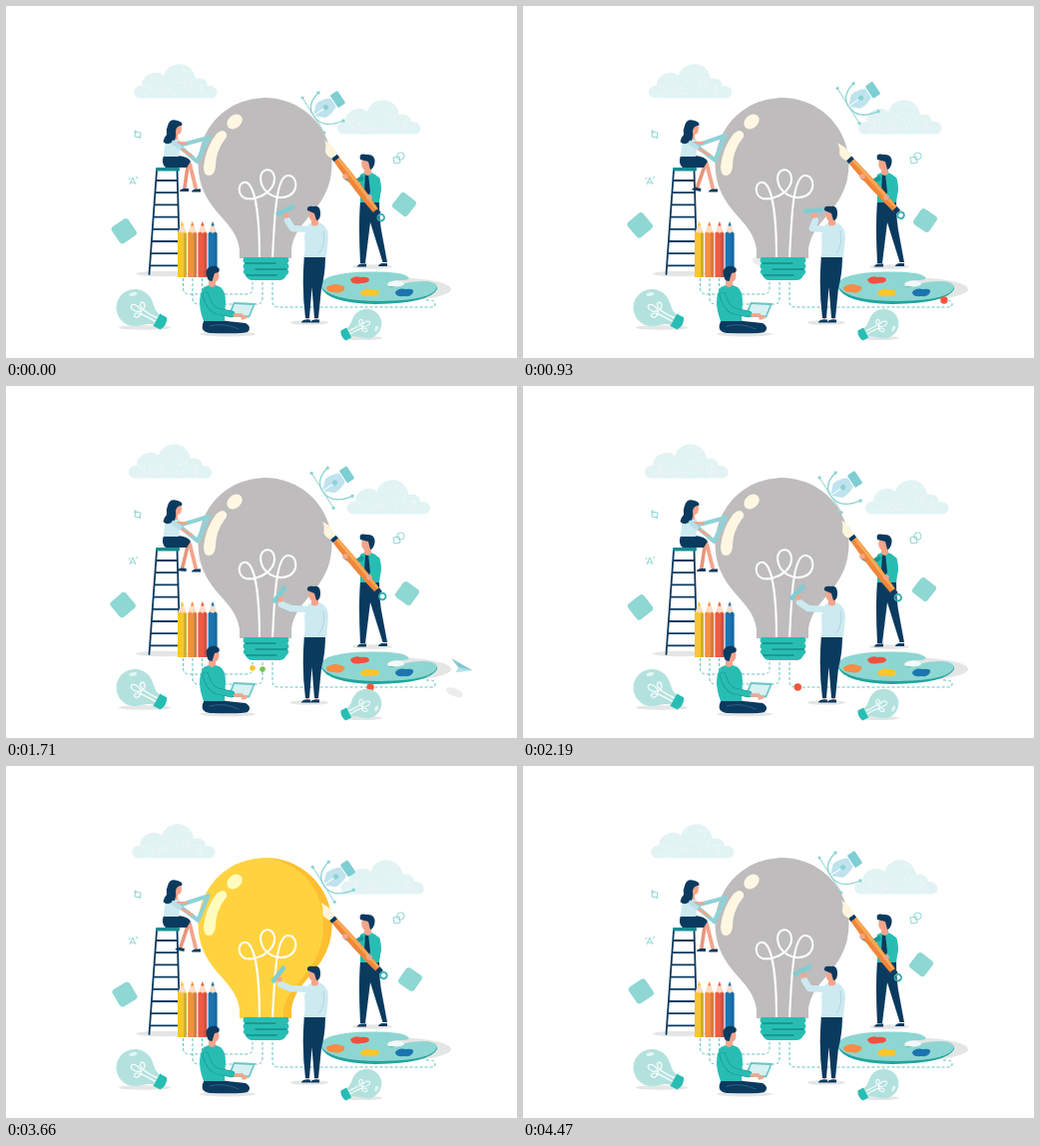
These frames come from a looping animation (512 by 353 pixels, 4.5 s). An HTML page:

```html
<!DOCTYPE html>
<html lang="en">
<head>
<meta charset="utf-8">
<title>Creative team around a light bulb</title>
<style>
html, body { margin: 0; width: 100%; height: 100%; overflow: hidden; background: #fff; }
svg { display: block; }
.line { fill: none; stroke-linecap: round; stroke-linejoin: round; }
.navy { fill: #0b3a5f; }
.teal { fill: #28bdb3; }
.skin { fill: #f3a58b; }
.pale { fill: #cdeaf1; }
.shade { fill: #e4e6e6; }
.dash { fill: none; stroke: #62c3bd; stroke-dasharray: 3 2; }
.icon { fill: none; stroke: #8ed6d3; stroke-width: 1; }
</style>
</head>
<body>
<svg width="512" height="353" viewBox="0 0 512 353">
  <defs>
    <g id="cloud">
      <path fill="#e2f3f4" d="M135 92.500C126 92.500 125.500 80 136 79.500C136 68 152 63 158 70C163 54 187 54 190 73C198 71 202 76 202 80C214 79 214 92.500 205 92.500Z"/>
      <g class="speckles" fill="#fff" opacity=".75"></g>
    </g>
    <g id="smallBulb">
      <path fill="#b3e2de" d="M-18.500 0A18.500 18.500 0 0 1 0 -18.500C13 -18.500 16 -7 25 -6V6C16 7 13 18.500 0 18.500A18.500 18.500 0 0 1 -18.500 0Z"/>
      <path class="line" stroke="#fff" stroke-width="1.200" d="M25 -2C12 -1 3 -2 3 -7C4 -11 10 -7 8 -2C6 4 -4 4 -4 0S6 -4 8 2C9 8 4 10 3 6C3 2 12 2 25 2"/>
      <path class="teal" d="M25 -7h8q4 7 0 14h-8z"/>
      <ellipse cx="-8" cy="-11" rx="4" ry="1.800" transform="rotate(-40 -8 -11)" fill="#e5f6f4"/>
    </g>
    <path id="shoe" class="navy" d="M0 0h5v3h-9q0-2 4-3z"/>
  </defs>

  <use id="cloudL" href="#cloud"/>
  <use id="cloudR" href="#cloud"/>

  <!-- small floating icons -->
  <path class="icon" d="M130 124l-1 7 6 1M128 126l7 1-1 6"/>
  <path class="icon" d="M124 179l3-7 3 7M125 177h4M130 173l2-2M124 172l-1 2"/>
  <g class="icon"><circle cx="395.500" cy="150.500" r="3.600"/><path d="M388 152l6-1 1 6-6 1z"/></g>
  <rect id="tileL" x="-10" y="-10" width="20" height="20" rx="3.500" fill="#8ed7d3"/>
  <rect id="tileR" x="-9.500" y="-9.500" width="19" height="19" rx="3.500" fill="#8ed7d3"/>

  <g id="plane">
    <ellipse cx="-7" cy="26" rx="9" ry="4" transform="rotate(22 -7 26)" fill="#ececec"/>
    <path fill="#b5e3e8" d="M-10 -8L11 4L-6 6L-3 1Z"/>
    <path fill="#83c8d0" d="M-10 -8L11 4L-3 1Z"/>
  </g>

  <g id="penTool">
    <g class="line" stroke="#8cd3d3">
      <path d="M297 92L319 127"/>
      <path d="M313 87Q301 99 308 110Q317 124 338 115" stroke-width="1.300"/>
    </g>
    <g fill="#8cd3d3"><circle cx="297" cy="92" r="1.600"/><circle cx="319" cy="127" r="1.600"/>
      <path d="M311.500 85.500h3v3h-3zM336.500 113.500h3v3h-3z"/></g>
    <g transform="translate(308 110) rotate(-34)">
      <path fill="#bfe3ee" d="M0 0L9 -8.500Q18 -9 24 -5V5Q18 9 9 8.500Z"/>
      <path class="line" stroke="#fff" d="M1 0H13"/><circle cx="15" r="2.600" fill="#8cd3d3"/>
      <rect x="25" y="-7.500" width="9" height="15" rx="1.500" fill="#7fced2"/>
    </g>
  </g>

  <!-- ladder -->
  <ellipse class="shade" cx="157" cy="268.500" rx="27" ry="2.800"/>
  <path id="ladder" class="line" stroke="#0b3a5f" stroke-width="1.800"/>
  <rect x="150" y="162" width="24" height="3.500" rx="1" fill="#168d91"/>

  <!-- big bulb -->
  <path id="glass" d="M203.600 196A67 67 0 1 1 315.400 196C304 214 289 222 286 244V253H234V244C231 222 215 214 203.600 196Z"/>
  <path id="rim" fill="#fdbf30" d="M262 92A67 67 0 0 1 315.400 196C304 214 289 222 286 244V253H278V244C282 219 319 204 318 159Q316 104 262 92Z"/>
  <g id="gloss">
    <ellipse cx="229" cy="116" rx="8.500" ry="6.500" transform="rotate(-42 229 116)"/>
    <path d="M211 128Q218 122 221 128Q222 131 219 134Q210 146 210 161Q209 170 203 170Q198 170 198 161Q200 142 211 128Z"/>
  </g>
  <path class="line" stroke="#fff" stroke-width="2.100" d="M254 253C254 225 252 182 241 177C232 175 231 190 240 193C252 195 270 186 269 172C268 161 255 162 255 173C256 188 272 196 284 190C294 184 291 169 282 170C270 172 269 215 267 253"/>
  <path class="teal" d="M239 252h43q3 3 0 6q3 3 0 6q3 3-1 6q-2 5-7 5h-27q-5 0-7-5q-4-3-1-6q-3-3 0-6q-3-3 0-6z"/>
  <path class="line" stroke="#128f8b" stroke-width="1.300" d="M240 258h30M250 264h31M241 270h30"/>

  <!-- wires and the signals running along them -->
  <path id="wireA" class="dash" d="M177.500 273V283Q177.500 289 184 289H241Q247 289 247 283V277"/>
  <path id="wireB" class="dash" d="M187 273V293Q187 299 193 299H251Q257 299 257 293V277"/>
  <path class="dash" d="M196.500 273V289M206.500 273V289"/>
  <path id="wireC" class="dash" d="M421 295H424Q430 295 430 299Q430 302 426 302H273Q267 302 267 296V277"/>

  <g id="pencils"></g>

  <!-- palette -->
  <ellipse class="shade" cx="384" cy="284" rx="62" ry="12"/>
  <path fill="#1fa59d" d="M315 281Q321 298 370 299Q425 298 432 284V281Z"/>
  <path fill="#8ed6d2" d="M315 280Q317 267 365 266.500Q395 266 402 271Q407 274 398 275Q381 275 382 280Q386 284 400 278Q428 273 432 281Q431 295 376 296Q323 296 315 280Z"/>
  <ellipse cx="391" cy="278.500" rx="8" ry="3" fill="#f1faf9"/>
  <path fill="#ef5140" d="M345 274q5-4 10-2q9-1 9 3q-1 3-8 3q-10 2-11-4z"/>
  <path fill="#f58d43" d="M321 282q7-5 14-2q6 1 4 4q-3 5-10 3q-9 0-8-5z"/>
  <path fill="#f9c62b" d="M355 287q5-5 11-3q9 0 8 4q-3 4-10 3q-9 1-9-4z"/>
  <path fill="#1c75b0" d="M390 287q3-5 11-3q8-1 7 3q-2 5-9 4q-9 1-9-4z"/>

  <circle id="dotA" r="2.800" fill="#f9c62b"/>
  <circle id="dotB" r="2.800" fill="#72c64b"/>
  <circle id="dotC" r="3.700" fill="#f0563f"/>

  <!-- small bulbs -->
  <ellipse class="shade" cx="139" cy="322.500" rx="26" ry="2.300"/>
  <use href="#smallBulb" transform="translate(129 302.500) rotate(29)"/>
  <ellipse class="shade" cx="357" cy="333" rx="20" ry="2"/>
  <use href="#smallBulb" transform="translate(361.500 318.500) rotate(153) scale(.8)"/>

  <!-- woman on the ladder -->
  <g id="backLeg">
    <path class="line" stroke="#e8957c" stroke-width="3.600" d="M180 157L182 161L179 182"/>
    <use href="#shoe" x="178" y="183"/>
  </g>
  <path class="line" stroke="#f3a58b" stroke-width="3.800" d="M180 156Q185 157 185 162L190 182"/>
  <use href="#shoe" x="190" y="183.500"/>
  <path class="navy" d="M158 150h14q11 1 13 6l-4 6h-21q-5-4-2-12z"/>
  <path class="pale" d="M162 132h9q4 1 4 7l-2 12h-15q0-12 4-19z"/>
  <path class="skin" d="M168 128h4v6h-5z"/><ellipse class="skin" cx="172" cy="123" rx="4" ry="6"/>
  <path class="navy" d="M162 120Q164 112 172 115Q178 117 176 120Q171 120 170 125Q171 130 169 135Q162 141 157.500 136Q158 132 161 129Q160 124 162 120Z"/>
  <g id="ruler">
    <path fill="none" stroke="#8fd2d8" stroke-width="4.200" stroke-linejoin="round" d="M173 140L203 132L191.500 156Z"/>
    <path class="line" stroke="#f3a58b" stroke-width="2.600" d="M169 139L178 145L186 150M172 137L181 138"/>
    <path class="line" stroke="#b7e0e7" stroke-width="4.600" d="M168 137L174 142"/>
  </g>

  <!-- seated man -->
  <ellipse class="shade" cx="222" cy="329" rx="28" ry="2.500"/>
  <path class="navy" d="M199 314Q210 313 221 316L240 318Q247 322 242 327Q237 329 204 328Q195 327 197 319Z"/>
  <path class="line" stroke="#2b6187" d="M204 321Q219 317 233 324"/>
  <path class="teal" d="M198 282Q207 277 215 282Q220 286 220 296L219 316H198Q190 295 198 282Z"/>
  <path fill="#69c6c8" d="M228 297L250 298L244 312.500L222 311.500Z"/><path fill="#d7f0f2" d="M229 299L247.500 300L243 310.500L225 309.500Z"/>
  <path class="line" stroke="#158f8b" stroke-width="6.500" d="M200 290Q204 304 212 306L226 309"/>
  <path class="line" stroke="#28bdb3" stroke-width="5.500" d="M200 290Q204 304 212 306L226 309"/>
  <path id="typing" class="line" stroke="#f3a58b" stroke-width="3.300" d="M229 310L236 310M237 313L240 312"/>
  <path class="skin" d="M203 272h7v8q-4 4-7 0z"/><ellipse class="skin" cx="208.500" cy="270" rx="5" ry="7"/>
  <path class="navy" d="M200.500 266Q202.500 260 210.500 261Q215.500 263 213 267L209 268L206.500 276Q200.500 276 200.500 266Z"/>

  <!-- standing man with pen -->
  <ellipse class="shade" cx="304" cy="317.500" rx="19" ry="2.300"/>
  <path class="line" stroke="#f3a58b" stroke-width="2.500" d="M302 312V315M311 312V315"/>
  <path class="navy" d="M299 250H320Q320 269 316 283L313 313H309L306.500 282L304 313H300Q296 282 299 250Z"/>
  <use href="#shoe" x="300" y="314.500"/><use href="#shoe" x="309" y="314.500"/>
  <path class="pale" d="M303 219Q309 215 316 218Q323 222 323 232L321 252H299Q300 240 299 230Z"/>
  <path class="line" stroke="#add6df" d="M318 226Q321 238 314 248"/>
  <path class="skin" d="M306 211h7v8q-4 3-7 0z"/><ellipse class="skin" cx="308" cy="209" rx="4.600" ry="7"/>
  <path class="navy" d="M302 205Q301 200 308 201Q315 199 315 208Q315 215 311 215L309 208Z"/>
  <rect id="pen" x="-10" y="-2.300" width="20" height="4.600" rx="1" fill="#7fcdd2"/>
  <path id="arm" class="line" stroke="#cdeaf1" stroke-width="6.500"/>
  <circle id="hand" class="skin" r="2.700"/>

  <!-- man with paintbrush -->
  <ellipse class="shade" cx="367" cy="261.500" rx="20" ry="2.300"/>
  <path class="navy" d="M355 196H374Q374 216 377 230L382 257H377.500L365 217L360 258H355Q353 220 355 196Z"/>
  <use href="#shoe" x="356" y="258.500"/><use href="#shoe" x="377" y="258"/>
  <path class="teal" d="M355 169Q363 164 370 169Q376 173 376 183L374 197H355Z"/>
  <path class="navy" d="M360 168h3l2 19-3 4-3-5z"/>
  <path class="skin" d="M359 161h7v7q-4 4-7 0z"/><ellipse class="skin" cx="361" cy="158" rx="4.800" ry="7"/>
  <path class="navy" d="M355 154Q353 147 361 149Q370 148 369.500 157Q368 164 365 164L363 156Z"/>
  <path class="line" stroke="#159d98" stroke-width="5" d="M356 173L350 177L341 172"/>
  <g id="brush">
    <g transform="translate(323 143) rotate(52.700)">
      <path fill="#fff4dc" d="M-9 -2Q1 -6 5 -4L11 -3V3Q2 7 -1 3Q-3 0 -9 -2Z"/>
      <path class="navy" d="M10 -3.500h4v7h-4z"/>
      <path fill="#f0863a" d="M14 -3.500Q50 -5 80 -3V3Q50 5 14 3.500Z"/>
      <path fill="#f8aa55" d="M14 -3Q50 -4.500 80 -2.500V-.5H14Z"/>
      <path class="navy" d="M78 -3h5v6h-5z"/><circle class="line" cx="87" r="3.300" stroke="#2aaeb0" stroke-width="1.800"/>
    </g>
  </g>
  <circle class="skin" cx="340" cy="171" r="2.800"/>
  <path class="line" stroke="#28bdb3" stroke-width="5.600" d="M372 174L373 186L366 191"/>
  <circle class="skin" cx="364" cy="192" r="2.800"/>
</svg>
<script>
const LOOP = 4500;
const $ = id => document.getElementById(id);
const clamp = v => Math.min(1, Math.max(0, v));
const place = (id, x, y, angle = 0) =>
  $(id).setAttribute('transform', `translate(${x} ${y}) rotate(${angle})`);
const turn = (id, angle, x, y) =>
  $(id).setAttribute('transform', `rotate(${angle} ${x} ${y})`);
const mix = (a, b, k) => `rgb(${a.map((v, i) => Math.round(v + (b[i] - v) * k))})`;

// Eased interpolation between pose values
const beats = [0, 930, 1710, 2190, 3000, 3660, LOOP];
function pose(t, values) {
  let i = 0;
  while (i < beats.length - 2 && t > beats[i + 1]) i++;
  const u = clamp((t - beats[i]) / (beats[i + 1] - beats[i]));
  return values[i] + (values[i + 1] - values[i]) * u * u * (3 - 2 * u);
}

// Static repeats
let rungs = 'M151 165L143.500 269M171.500 165L174.500 269';
for (let y = 175; y < 265; y += 12.200) {
  const k = (y - 165) / 104;
  rungs += `M${151 - 7.500 * k} ${y}H${171.500 + 3 * k}`;
}
$('ladder').setAttribute('d', rungs);

$('pencils').innerHTML = ['#f9c62b', '#f58d43', '#ee5a41', '#1c75b0'].map((color, i) =>
  `<g transform="translate(${172 + i * 10.200} 216)">
    <path fill="#fbdcc6" d="M4.500 0L0 12H9Z"/><path fill="${color}" d="M4.500 0L2.800 4.500H6.200ZM0 12Q2 9 4.500 12Q7 9 9 12V56H0Z"/>
    <path fill="#0b3a5f" opacity=".17" d="M6 12H9V56H6Z"/></g>`).join('');

let seed = 7;
const random = () => (seed = seed * 16807 % 2147483647) / 2147483647;
let speckles = '';
for (let i = 0; i < 110; i++) {
  const x = 136 + random() * 66, y = 92 - random() * (x > 161 && x < 190 ? 30 : 14);
  speckles += `<circle cx="${x}" cy="${y}" r=".5"/>`;
}
document.querySelector('.speckles').innerHTML = speckles;

function runDot(name, t, start, end) {
  const u = (t - start) / (end - start), wire = $('wire' + name), dot = $('dot' + name);
  dot.style.display = u > 0 && u < 1 ? '' : 'none';
  const p = wire.getPointAtLength(wire.getTotalLength() * clamp(u) ** 1.700);
  place('dot' + name, p.x, p.y);
}

function draw(t) {
  const phase = 2 * Math.PI * t / LOOP;
  const drift = (1 - Math.cos(phase)) / 2;
  const sway = (1 - Math.cos(2 * phase)) / 2;

  place('cloudL', -6 * drift, 0);
  place('cloudR', 204 + 11 * drift, 36);

  const bob = Math.sin(phase - .35);
  place('tileL', 118 - bob, 224 - 5 * bob, -36 - 5 * bob);
  place('tileR', pose(t, [399, 403, 402, 402, 405, 405, 399]),
    pose(t, [199, 215, 208, 204, 218, 214, 199]), 38 - 4 * sway);

  const firstHalf = t < LOOP / 2;
  place('penTool', (firstHalf ? 19.500 : 12) * sway, (firstHalf ? -10 : 11) * sway);
  turn('brush', -5.500 * sway, 350, 179);
  turn('ruler', -4 * sway, 172, 140);
  turn('backLeg', 12 * sway, 181, 160);
  place('typing', sway, 0);

  const x = pose(t, [280, 291, 274, 275, 278, 273, 280]);
  const y = pose(t, [205, 205, 209, 207, 205, 209, 205]);
  place('pen', x, y, pose(t, [-27, -5, -53, -45, -37, -52, -27]));
  $('arm').setAttribute('d', `M304 224L${287 + (x - 280) / 4} 223L${x + 2} ${y + 10}`);
  place('hand', x + 1, y + 5);

  // The plane crosses behind the bulb
  const planeX = t < 930 ? 245 + (t - 930) * .577
    : t < 1620 ? 245 + (t - 930) * .254
    : 420 + (t - 1620) * .4;
  place('plane', planeX, 182 + (planeX - 38) * .237);

  runDot('A', t, 960, 1740);
  runDot('B', t, 960, 1740);
  runDot('C', t, 870, 2330);

  const light = clamp((t - 2300) / 300) * clamp((4440 - t) / 340);
  $('glass').setAttribute('fill', mix([190, 188, 188], [255, 211, 64], light));
  $('gloss').setAttribute('fill', mix([255, 247, 226], [255, 252, 190], light));
  $('rim').setAttribute('opacity', light);
}

function frame() {
  draw(performance.now() % LOOP);
  requestAnimationFrame(frame);
}
frame();
</script>
</body>
</html>
```
